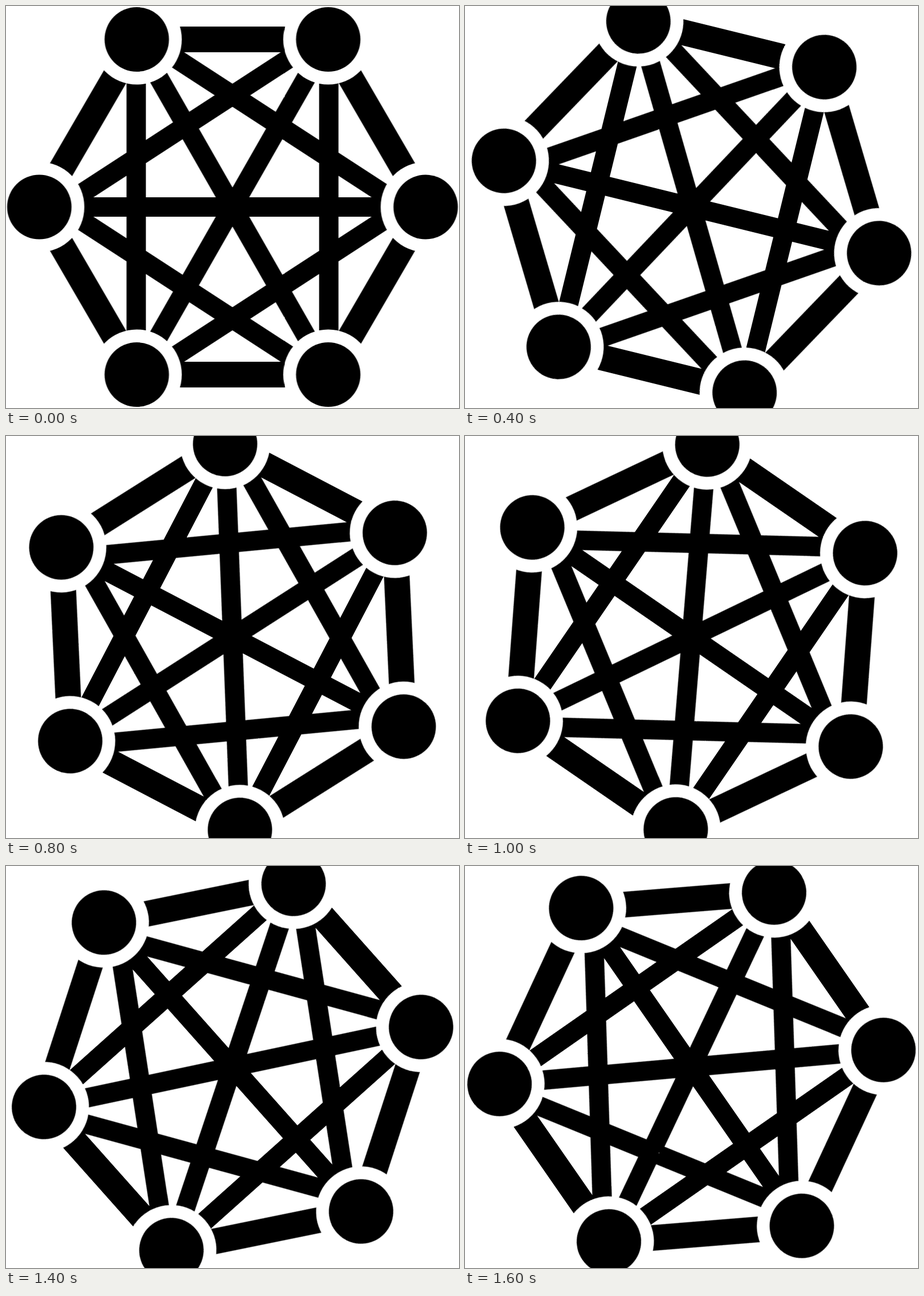
An HTML page for the animation above (1700 ms loop, 795x704 px).

```html
<!DOCTYPE html>
<html lang="en">
<head>
<meta charset="utf-8">
<title>Rotating mesh</title>
<style>
  html, body { margin: 0; width: 100%; height: 100%; overflow: hidden; background: #fff; }
  svg { display: block; width: 795px; height: 704px; }
  line { stroke: #000; stroke-width: 34; }
  .rim { stroke-width: 45; }
  .gap { fill: #fff; }
</style>
</head>
<body>
<svg viewBox="0 0 795 704">
  <g transform="translate(397.5 352)"><g id="mesh"></g></g>
</svg>
<script>
  const LOOP = 1700, STEPS = 17, STEP_DEG = 3.448;
  const mesh = document.getElementById('mesh');

  function add(tag, attrs) {
    const el = document.createElementNS('http://www.w3.org/2000/svg', tag);
    for (const key in attrs) el.setAttribute(key, attrs[key]);
    mesh.append(el);
  }

  function bar([x1, y1], [x2, y2], cls = 'link') {
    add('line', { x1, y1, x2, y2, class: cls });
  }

  const nodes = [[339, 0], [168, 293.5], [-168, 293.5], [-339, 0], [-168, -293.5], [168, -293.5]];

  nodes.forEach((p, i) => bar(p, nodes[(i + 1) % 6], 'rim'));
  for (let i = 0; i < 3; i++) bar(nodes[i], nodes[i + 3]);

  // Short diagonals run slightly off the node centres.
  const slope = 0.649, cross = 195.7;
  for (const sx of [-1, 1]) {
    bar([sx * 169, -290], [sx * 169, 290]);
    for (const sy of [-1, 1]) {
      const at = x => [sx * x, sy * (cross + slope * x)];
      bar(at(-300), at(140));
    }
  }

  for (const [cx, cy] of nodes) {
    add('circle', { cx, cy, r: 79, class: 'gap' });
    add('circle', { cx, cy, r: 56.5 });
  }

  mesh.animate(
    { transform: ['rotate(0deg)', `rotate(${STEPS * STEP_DEG}deg)`] },
    { duration: LOOP, iterations: Infinity, easing: `steps(${STEPS}, end)` }
  );
</script>
</body>
</html>
```
